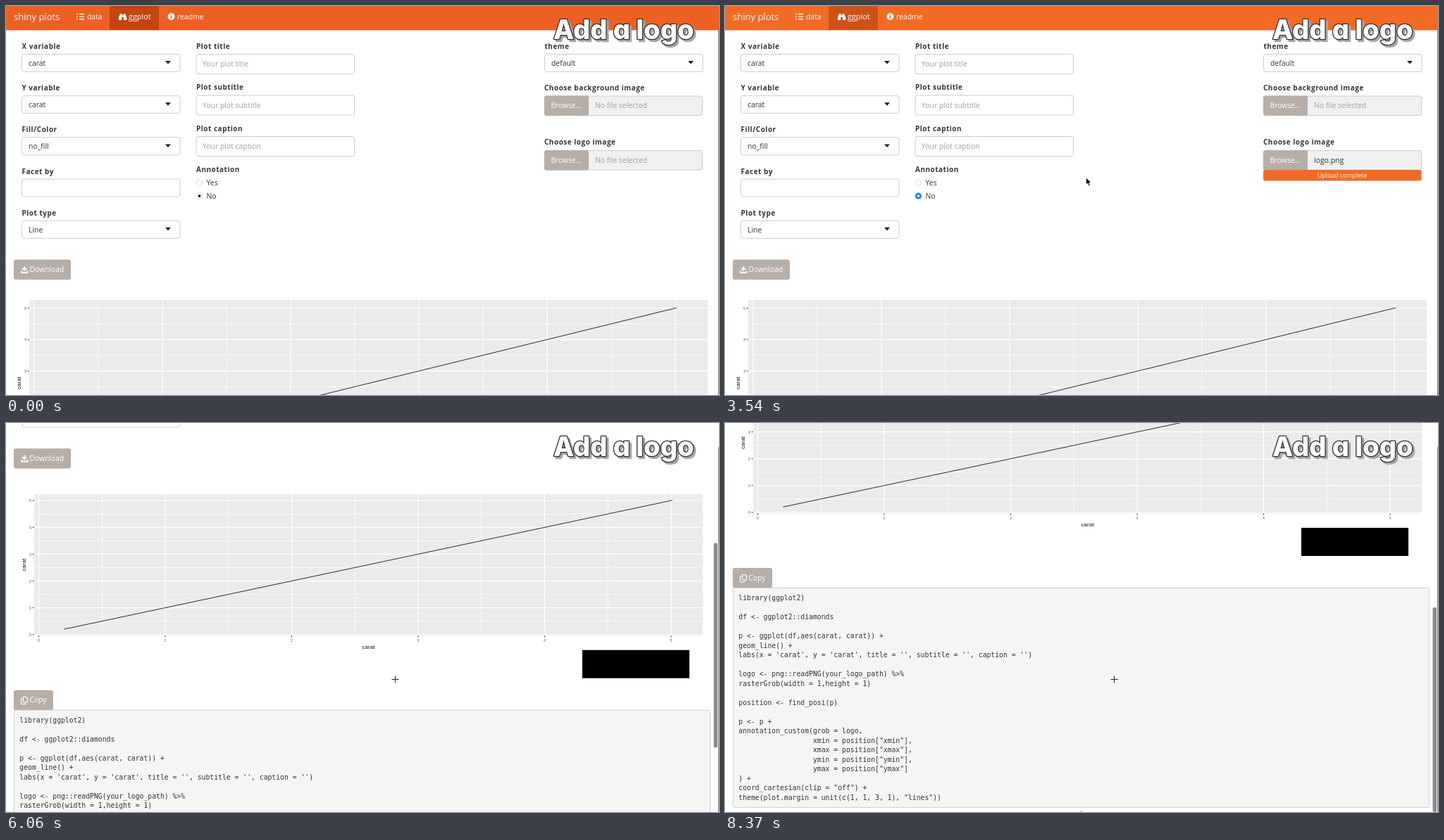
Write an HTML page that moves like this. It is 1012 px wide and 553 px high and loops after 8430 ms.

```html
<!DOCTYPE html>
<html lang="en">
<head>
<meta charset="utf-8">
<title>Add a logo</title>
<style>
html, body { margin: 0; width: 100%; height: 100%; overflow: hidden; background: #fff; }
svg { display: block; width: 100vw; height: 100vh; }
text { white-space: pre; font-family: "Open Sans", "Noto Sans", sans-serif; }
.ui text { font-family: Inter, sans-serif; }
.axis text { font-family: "Liberation Sans", sans-serif; }
.code text { font-family: "DejaVu Sans Mono", monospace; }
.label { font-weight: 700; letter-spacing: .5px; }
.title text { font: 800 38px Inter, sans-serif; font-feature-settings: "cv11"; stroke-linejoin: round; paint-order: stroke; }
</style>
</head>
<body>
<svg id="stage" viewBox="0 0 1012 553"></svg>
<script>
const LOOP = 8430, PAGE = 1051, VIEW = 553;
const GREY = '#b7aea7', INK = '#333';

const esc = s => s.replace(/&/g, '&amp;').replace(/</g, '&lt;');
const rect = (x, y, w, h, fill, more = '') =>
  `<rect x="${x}" y="${y}" width="${w}" height="${h}" fill="${fill}" ${more}/>`;
const path = (d, stroke, width = 1, more = 'fill="none"') =>
  `<path d="${d}" stroke="${stroke}" stroke-width="${width}" ${more}/>`;
const dot = (x, y, r, fill, more = '') => `<circle cx="${x}" cy="${y}" r="${r}" fill="${fill}" ${more}/>`;
const text = (x, y, s, size = 10.4, fill = INK, more = '') =>
  `<text x="${x}" y="${y}" font-size="${size}" fill="${fill}" ${more}>${esc(s)}</text>`;
const label = (x, y, s) => text(x, y, s, 10, INK, 'class="label"');
const group = (id, body, more = '') => `<g id="${id}" ${more}>${body}</g>`;
const range = (n, f) => Array.from({ length: n }, (_, i) => f(i)).join('');

// Form controls
const box = (x, y, w, h) => rect(x, y, w, h, '#fff', 'stroke="#ccc" rx="3"');
const select = (x, y, name, value) =>
  label(x, y - 7.5, name) + box(x, y, 224.5, 25) + text(x + 9.5, y + 16.2, value) +
  (value && `<path d="M${x + 203.5} ${y + 9.5}h8l-4 4.6z" fill="#222"/>`);
const input = (y, name, hint) =>
  label(270, y - 8, name) + box(270, y, 224.5, 28) + text(279, y + 17.8, hint, 10.4, '#a0a0a0');
const button = (x, y, w, s) =>
  rect(x, y, w, 28.5, GREY, 'rx="3"') + text(x + 22.5, y + 17.6, s, 10.3, '#fff');
const upload = (y, name, id, value) =>
  label(764, y - 8, name) + rect(764.5, y + .5, 224, 27.5, '#f0f0f0', 'stroke="#ccc" rx="3"') +
  rect(764, y, 63, 28.5, GREY, `id="${id}" rx="3"`) +
  text(773.5, y + 17.5, 'Browse...', 10.2, '#fff') + value;

const header =
  rect(0, 0, 1012, 34.5, '#f16b26', 'id="bar"') + rect(147, 0, 70, 34, '#cd5218', 'id="tab"') +
  group('pale', rect(0, 0, 1012, 34.5, '#e39a7d') + rect(147, 0, 70, 34, '#cf8165')) +
  text(11, 19.8, 'shiny plots', 13, '#fff') +
  range(3, i => path(`M100 ${11.5 + i * 3.6}h2m2 0h7`, '#fff', 1.4)) + text(115, 18.8, 'data', 10.4, '#fff') +
  '<path d="M160 20v-4l2-5h2.6v2h2V11h2.6l2 5v4h-4.2v-4h-2.800v4z" fill="#fff"/>' +
  text(174, 18.8, 'ggplot', 10.8, '#fff') +
  dot(234.5, 15, 5, '#fff') + path('M234.500 11.600v1.500m0 1v3.800', '#e8672a', 1.6) +
  text(243, 18.8, 'readme', 10.4, '#fff');

const form =
  [['X variable', 'carat'], ['Y variable', 'carat'], ['Fill/Color', 'no_fill'], ['Facet by', ''], ['Plot type', 'Line']]
    .map(([n, v], i) => select(22.5, 68.5 + i * 59.2, n, v)).join('') +
  ['title', 'subtitle', 'caption'].map((s, i) => input(68.5 + i * 58.5, 'Plot ' + s, 'Your plot ' + s)).join('') +
  label(270, 236, 'Annotation') + text(284.5, 255, 'Yes') + text(284.5, 273.8, 'No') +
  dot(274.5, 251.2, 4.2, '#fff', 'stroke="#ccc" stroke-width=".8"') +
  group('radioOff', dot(274.5, 270, 4.2, '#fff', 'stroke="#ccc" stroke-width=".8"') + dot(274.5, 270, 2, '#222')) +
  group('radioOn', dot(274.5, 270, 4.6, '#2583e6') + dot(274.5, 270, 1.7, '#fff')) +
  select(764.5, 68.5, 'theme', 'default') +
  upload(127.5, 'Choose background image', 'browse1', text(836, 145, 'No file selected', 10.4, '#a0a0a0')) +
  upload(205, 'Choose logo image', 'browse2',
    group('empty', text(836, 222.500, 'No file selected', 10.4, '#a0a0a0')) +
    group('loaded', text(836, 222.5, 'logo.png') + rect(764, 233, 224.5, 15.5, '#f16b26', 'rx="3"') +
      text(876, 243.8, 'Upload complete', 8.8, '#fff', 'text-anchor="middle"'))) +
  button(11, 360.5, 81, 'Download') +
  path('M26.200 370v5.500m-3-2.800 3 3 3-3M22 376.200v2.800h8.500v-2.800', '#fff', 1.8);

// Line chart: v0 is the position of value 0, step the distance between whole values
function chart(id, left, top, right, bottom, x0, dx, y0, dy, titleX) {
  const X = v => x0 + v * dx, Y = v => y0 - v * dy;
  const grid = (v, w) =>
    path(`M${X(v)} ${top}V${bottom}M${left} ${Y(v)}H${right}`, '#fff', w);
  const mid = (top + bottom) / 2;
  return group(id,
    rect(left, top, right - left, bottom - top, '#ebebeb') +
    range(5, i => grid(i + .5, .6)) + range(6, i => grid(i, 1.2)) +
    range(6, i => path(`M${X(i)} ${bottom}v2.5M${left} ${Y(i)}h-2.5`, INK, .9) +
      text(X(i), bottom + 8.5, '' + i, 6, '#666', 'text-anchor="middle"') +
      text(left - 4, Y(i) + 2.2, '' + i, 6, '#666', 'text-anchor="end"')) +
    path(`M${X(.2)} ${Y(.2)}L${X(5.01)} ${Y(5.01)}`, '#222', .95) +
    text((left + right) / 2, bottom + 18.5, 'carat', 8.1, '#111', 'text-anchor="middle"') +
    text(0, 0, 'carat', 8.1, '#111', `text-anchor="middle" transform="translate(${titleX} ${mid}) rotate(-90)"`),
    'class="axis"');
}

const indent = ' '.repeat(18);
const code = `library(ggplot2)

df <- ggplot2::diamonds

p <- ggplot(df,aes(carat, carat)) +
geom_line() +
labs(x = 'carat', y = 'carat', title = '', subtitle = '', caption = '')

logo <- png::readPNG(your_logo_path) %>%
rasterGrob(width = 1,height = 1)

position <- find_posi(p)

p <- p +
annotation_custom(grob = logo,
${['xmin', 'xmax', 'ymin', 'ymax'].map(s => `${indent}${s} = position["${s}"]`).join(',\n')}
) +
coord_cartesian(clip = "off") +
theme(plot.margin = unit(c(1, 1, 3, 1), "lines"))`.split('\n');

const page =
  rect(0, 0, 1012, PAGE, '#fff') + form +
  chart('before', 33, 418, 996, 654, 40, 182, 653, 44.7, 21) +
  chart('after', 40, 425.5, 989, 626.5, 46.5, 179.5, 625, 38.1, 28) +
  rect(818, 647, 152, 40, '#000', 'id="logo"') +
  button(11, 704, 56, 'Copy') +
  path('M24.500 713.500h4l2 2v5.500h-6zM24 716h-2.500v8h6v-2.500', '#fff', 1.1) +
  rect(11.5, 732.5, 988, 312, '#f5f5f5', 'stroke="#d0d0d0" rx="2"') +
  group('code', code.map((s, i) => text(19.3, 750 + i * 13.5, s, 9.75)).join(''), 'class="code"') +
  rect(0, 34.5, 1012, PAGE, '#a8a8a8', 'id="dim"') + header;

// File dialog
const BLUE = '#2a8fe6';
const icons = {
  clock: y => dot(225.5, y, 4.8, 'none', `stroke="${BLUE}"`) + path(`M225.500 ${y - 3}v3h-2.500`, BLUE),
  apps: y => path(`M221 ${y + 4.500}l5-9m-1 0 5 9m-10-3h11`, BLUE, 1.2),
  desk: y => path(`M220 ${y - 4}h11v8h-11zm0 2h11m-9 4h7`, BLUE),
  doc: y => path(`M222 ${y - 5}h4l3.500 3.500v6.500h-7.500zm4 0v3.500h3.500`, BLUE),
  down: y => dot(225.5, y, 4.8, 'none', `stroke="${BLUE}"`) + path(`M225.500 ${y - 3}v5.500m-2.500-2 2.500 2 2.500-2`, BLUE),
  cloud: y => path(`M222 ${y + 3.500}a2.600 2.600 0 0 1 0-5.200a3.800 3.800 0 0 1 7-.5a2.800 2.800 0 0 1 0 5.700z`, BLUE),
  share: y => path(`M220 ${y + 4}v-8h4l1 1.500h6v6.500zm0-5h11`, BLUE) + dot(229.5, y + 1.5, 1.6, BLUE),
  globe: y => dot(225.5, y, 4.8, 'none', 'stroke="#777"') + path(`M221 ${y}h9m-4.500-4.500v9m-3-8 6 7m0-7-6 7`, '#777', .7),
};
const tag = color => y => dot(225.5, y, 3.8, color);
const sidebar = [
  [105, 'Favorites'], [122.5, 'Recents', icons.clock], [143.5, 'Applicati...', icons.apps],
  [164.5, 'Desktop', icons.desk], [185.5, 'Documents', icons.doc], [206.5, 'Downloads', icons.down],
  [234, 'eVault'], [251.5, 'eVault Dri...', icons.cloud], [272.5, 'Shared', icons.share],
  [300, 'Locations'], [317.5, 'Network', icons.globe],
  [345, 'Tags'], [362.5, 'Red', tag('#e0341c')], [383.5, 'Orange', tag('#f59a16')],
  [404.5, 'Yellow', tag('#f5a31c')], [425.5, 'Green', tag('#3fae5c')],
].map(([y, s, icon]) => icon ? icon(y) + text(236, y + 3.4, s, 9.3) : text(218, y + 3, s, 8.2, '#958f8d', 'font-weight="500"')).join('');

const fileRow = (y, name, date, size, kind, ink, soft) =>
  text(338, y, name, 9.55, ink) + text(545, y, date, 9.45, soft) +
  text(743.5, y, size, 9.3, soft, 'text-anchor="end"') + text(754, y, kind, 9.2, soft);
const thumb = y => rect(323.5, y, 10, 6, '#f4f4f4', 'stroke="#aaa" stroke-width=".7"');
const logoRow = ['logo', 'Sep 23, 2018 at 10:16 PM', '30 KB', 'PNG image'];
const chevron = (x, y = 128, c = '#555') => path(`M${x - 2.5} ${y - 1}l2.500 2.500 2.500-2.500`, c, 1.2);
const pill = (x, y, w, h) => rect(x, y, w, h, '#fff', 'stroke="#e4e4e4" stroke-width=".8" rx="3.5"');

const dialog =
  rect(206.5, 96, 599.5, 340, '#000', 'rx="12" opacity=".3" filter="url(#soft)"') +
  `<g clip-path="url(#sheet)">` +
  rect(206, 88, 600, 335, '#fff') + rect(206, 88, 96.500, 335, '#e9e3e1') + rect(302, 88, .8, 335, '#d2cccb') +
  sidebar + rect(295, 89.5, 5.5, 211, '#a8a2a0', 'rx="2.7"') +
  text(554.500, 103.500, 'Choose Files to Upload', 8.2, INK, 'text-anchor="middle" font-weight="500"') +
  pill(317, 121, 36, 15) + path('M335 121v15', '#e4e4e4', .8) +
  path('M328 125l-3.500 3.500 3.500 3.500M343 125l3.500 3.500-3.500 3.500', '#b5b5b5', 1.2) +
  pill(359, 121, 34, 15) + range(3, i => path(`M367 ${125.5 + i * 3}h1.500m1.500 0h7`, '#555', 1.1)) + chevron(386) +
  pill(399.5, 121, 34, 15) +
  range(6, i => rect(406 + i % 3 * 4, 124.5 + (i > 2) * 5, 3, 3, 'none', 'stroke="#555" stroke-width=".9"')) + chevron(425.5) +
  pill(477, 121, 156, 15) + path('M483 124.500h4l1 1.500h7v7.500h-12z', '#4ba9e3', .6, 'fill="#6cc3f3"') +
  text(498, 132, 'www', 9.4) + rect(618.5, 122.5, 12, 12, '#1677f0', 'rx="3"') +
  path('M622 127.300l2.500-2.300 2.500 2.300m-5 2.500 2.500 2.300 2.500-2.300', '#fff', 1.2) +
  pill(676, 121, 114, 15) + dot(685.5, 128, 3, 'none', 'stroke="#555"') + path('M687.600 130.200l2.600 2.600', '#555', 1.2) +
  text(697, 132, 'Search', 9.3, '#b0b0b0') +
  rect(303, 152.5, 503, .9, '#ddd') + rect(303, 173, 503, .9, '#ddd') +
  [539.5, 674.5, 747.5].map(x => rect(x, 155, .8, 16, '#d8d8d8')).join('') +
  text(338, 166, 'Name', 8.2, '#555') + text(545, 166, 'Date Modified', 8.1, '#222', 'font-weight="600"') +
  chevron(665.5, 163, '#777') + text(680.5, 166, 'Size', 8.2, '#555') + text(754, 166, 'Kind', 8.2, '#555') +
  range(7, i => rect(303, 192.8 + i * 29.9, 503, i < 6 ? 15 : 5.8, '#f4f4f4')) +
  thumb(182.500) + fileRow(188.6, '02_create_annotation.gif', 'Today at 10:22 PM', '2.3 MB', 'GIF Image', INK, '#858585') +
  thumb(197.5) + fileRow(203.6, '01_create_scatter_plot.gif', 'Today at 10:16 PM', '4.5 MB', 'GIF Image', INK, '#858585') +
  fileRow(218.7, ...logoRow, INK, '#858585') +
  group('picked', rect(303, 207.8, 503, 15, '#1463d8') + fileRow(218.7, ...logoRow, '#fff', '#fff')) +
  rect(324, 211, 9, 9, '#000') +
  rect(303, 378, 503, .9, '#e2e2e2') +
  pill(676.5, 392.5, 54.5, 15.5) + text(703.7, 403.7, 'Cancel', 9.3, '#222', 'text-anchor="middle" font-weight="500"') +
  pill(736.5, 392.500, 54.5, 15.5) + text(763.7, 403.7, 'Upload', 9.3, '#bbb', 'text-anchor="middle"') +
  group('ready', rect(736.5, 392.5, 54.5, 15.5, '#1677f0', 'rx="3.5"') +
    text(763.7, 403.7, 'Upload', 9.3, '#fff', 'text-anchor="middle"')) + '</g>';

const stage = document.getElementById('stage');
stage.innerHTML =
  `<defs><filter id="soft" x="-20%" y="-20%" width="140%" height="140%"><feGaussianBlur stdDeviation="11"/></filter>
   <clipPath id="sheet">${rect(206.5, 88, 599.5, 335, '#fff', 'rx="8"')}</clipPath></defs>` +
  group('page', page) + rect(1011, 34, 1, 519, '#777') +
  group('dialog', dialog, 'class="ui"') +
  rect(1004.5, 0, 5.5, VIEW * VIEW / PAGE, '#8c8c8c', 'id="scrollbar" rx="2.7"') +
  dot(506, 554, 2.2, '#aaa', 'id="speck"') +
  `<g class="title">${text(780, 50, 'Add a logo', 38, '#a6a6a6', 'stroke="#a6a6a6" stroke-width="2.5"')}` +
  `${text(777, 47, 'Add a logo', 38, '#fff', 'stroke="#333" stroke-width="2.6"')}</g>` +
  `<path id="arrow" d="M0 0v10l2.300-2.100 1.700 3.900 1.900-.8-1.700-3.800h3.200z" fill="#000" stroke="#fff" stroke-width=".8"/>` +
  path('M552.500 359.500v10m-5-5h10', '#222', 1, 'id="cross" fill="none"');

const el = {};
stage.querySelectorAll('[id]').forEach(e => el[e.id] = e);
const set = (id, name, value) => el[id].setAttribute(name, value);
const show = (id, on) => set(id, 'opacity', +on);

// Keys are [time, ...values]
const scrollKeys = [[3960, 0], [4150, 50], [4400, 160], [4650, 210], [4800, 210], [5100, 245], [5730, 245],
  [6060, 324], [6540, 443], [6800, 478], [7440, 495], [8040, 498]];
const cursorKeys = [[60, 640, 540], [700, 795, 222], [1650, 795, 222], [2280, 574, 204], [2460, 560, 213],
  [2560, 560, 213], [2950, 764, 401], [3080, 764, 401], [3540, 512.5, 244], [3750, 552, 364]];
const smooth = u => u * u * (3 - 2 * u);
const clamp = u => Math.min(1, Math.max(0, u));
function at(keys, t, ease = u => u) {
  const i = keys.findIndex(k => k[0] > t);
  if (i === 0) return keys[0].slice(1);
  if (i < 0) return keys[keys.length - 1].slice(1);
  const a = keys[i - 1], b = keys[i], u = ease((t - a[0]) / (b[0] - a[0]));
  return a.slice(1).map((v, j) => v + (b[j + 1] - v) * u);
}

function draw(t) {
  const [scroll] = at(scrollKeys, t);
  const [x, y] = at(cursorKeys, t, smooth);
  const sheet = smooth(clamp((t - 900) / 300)) * (1 - smooth(clamp((t - 3060) / 240)));
  const active = t >= 870, sent = t >= 3180, replot = t >= 3750, overPlot = scroll > 46;

  set('page', 'transform', `translate(0 ${-scroll})`);
  set('bar', 'fill', active ? '#f16b26' : '#ed6023');
  set('tab', 'fill', active ? '#cd5218' : '#c4450f');
  set('browse2', 'fill', t >= 650 && t < 3060 ? '#8f8780' : GREY);
  show('radioOff', !active); show('radioOn', active);
  show('empty', !sent); show('loaded', sent);
  show('before', !replot); show('after', replot); show('logo', replot);
  show('dim', sheet * .47); show('pale', sheet); show('dialog', sheet);
  show('picked', t >= 2490); show('ready', t >= 2490);
  show('scrollbar', t >= 3960);
  set('scrollbar', 'y', scroll * VIEW / PAGE);
  show('speck', t >= 8370);
  set('arrow', 'transform', `translate(${x} ${y})`);
  show('arrow', t >= 60 && !overPlot); show('cross', overPlot);
}

const start = performance.now();
function tick() {
  draw((performance.now() - start) % LOOP);
  requestAnimationFrame(tick);
}
tick();
</script>
</body>
</html>
```
